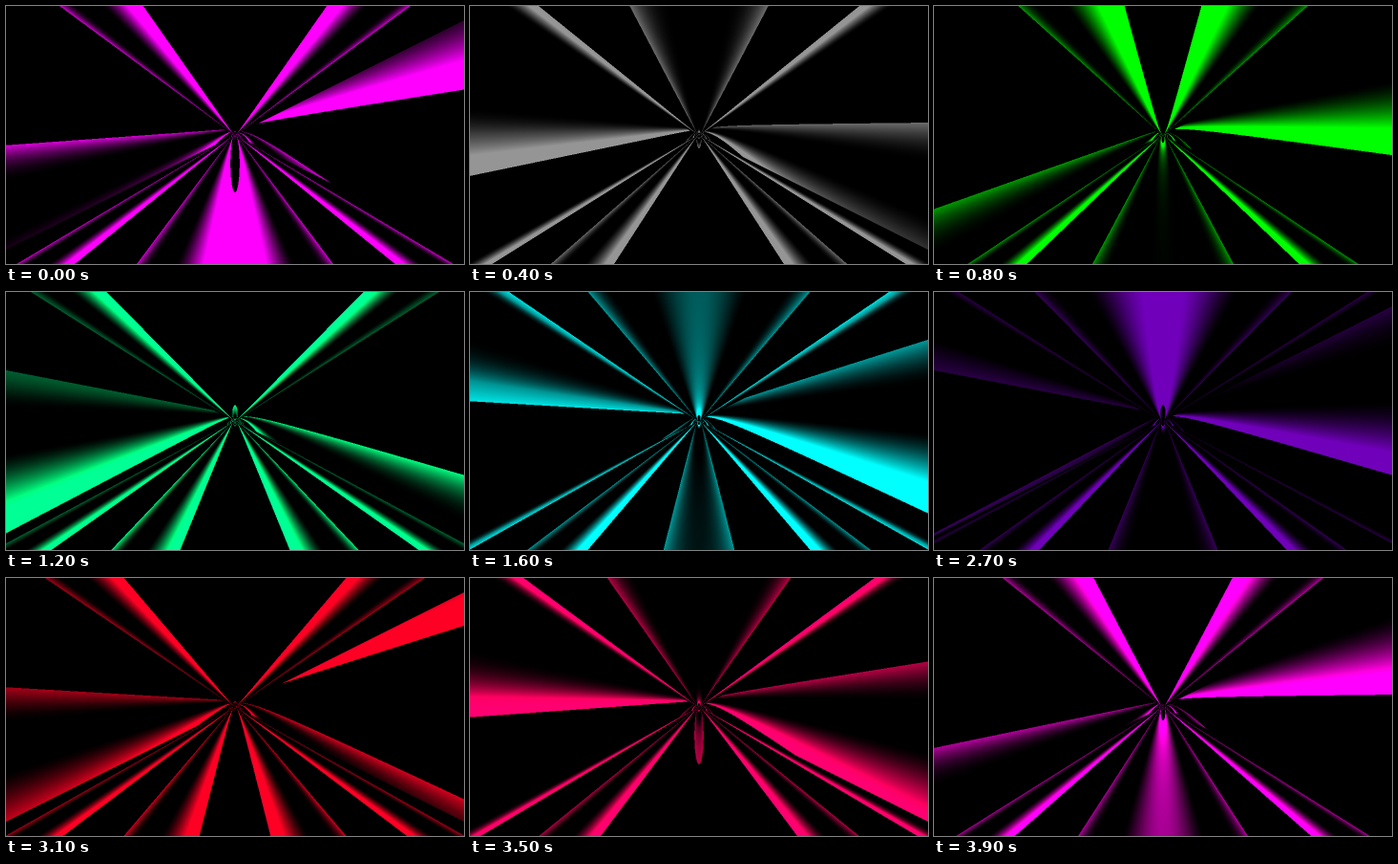
These frames come from a looping animation (480x270 px, 4 s). An HTML page with a canvas:

```html
<!DOCTYPE html>
<html>
<head>
<meta charset="utf-8">
<style>
html, body { margin: 0; overflow: hidden; background: #000; }
canvas { display: block; width: 480px; height: 270px; }
</style>
</head>
<body>
<canvas id="stage" width="960" height="540"></canvas>
<script>
// Drawn at double size so that the ray edges come out smooth.
const SCALE = 2, W = 480 * SCALE, H = 270 * SCALE, STEP = 100, STEPS = 40, CYCLE = 10;
const COLORS = [[255, 0, 255], [0, 255, 0], [0, 255, 255], [0, 0, 255], [255, 0, 0]];
const GAIN = 1.17;
const ctx = document.getElementById('stage').getContext('2d');
const image = ctx.createImageData(W, H);
const clamp = (v, max = 1) => Math.max(0, Math.min(max, v));

// Moment, in cycles, when a point goes dark.
function darkTime(dx, dy) {
  const r = Math.hypot(dx, dy), s = dy / r, u = Math.abs(dx / dy);
  if (u > 2) {
    return dx > 0
      ? 0.893 - 0.69 * s - (7.5 + 4.5 * s) / r
      : 1.555 - 0.765 * s - 5 / r;
  }
  return dy > 0
    ? 0.03 + 1.165 * (Math.hypot(0.5, u) - 0.5) - 1.8 / r
    : 0.76 + 1.08 * (Math.hypot(1, u) - 1) - 1 / r;
}

// Lit for half a cycle: flash and decay, then swell up to a hard cut.
function glow(left, flashPeak) {
  if (left >= 0.5) return 0;
  const flash = flashPeak * clamp(1 - (0.5 - left) * 8) ** 2;
  return Math.max(flash, clamp((0.225 - left) * 7, 1.2) ** 1.5);
}

const offTime = new Float32Array(W * H), peak = new Float32Array(W * H), flashPeak = new Float32Array(W * H);
for (let i = 0; i < W * H; i++) {
  const x = (i % W + 0.5) / SCALE, y = (Math.floor(i / W) + 0.5) / SCALE;
  const t = offTime[i] = darkTime(x - 240, y - 135);
  peak[i] = clamp((1.79 - t) * 4);
  flashPeak[i] = 0.78 + 0.22 * Math.cos(2 * Math.PI * (t - 0.7));
}

function colorAt(step) {
  const span = STEPS / COLORS.length, k = Math.floor(step / span), f = step / span - k;
  const next = COLORS[(k + 1) % COLORS.length];
  return COLORS[k].map((c, i) => c + (next[i] - c) * f);
}

function draw(step) {
  const [r, g, b] = colorAt(step), phase = step % CYCLE / CYCLE, px = image.data;
  for (let i = 0; i < W * H; i++) {
    const d = offTime[i] - phase, p = i * 4;
    const v = peak[i] * Math.min(GAIN, glow(d - Math.floor(d), flashPeak[i]));
    px[p] = r * v;
    px[p + 1] = g * v;
    px[p + 2] = b * v;
    px[p + 3] = 255;
  }
  ctx.putImageData(image, 0, 0);
}

let shown = 0;
const start = performance.now();
function tick() {
  const step = Math.floor((performance.now() - start) / STEP) % STEPS;
  if (step !== shown) draw(shown = step);
  requestAnimationFrame(tick);
}
draw(0);
tick();
</script>
</body>
</html>
```
